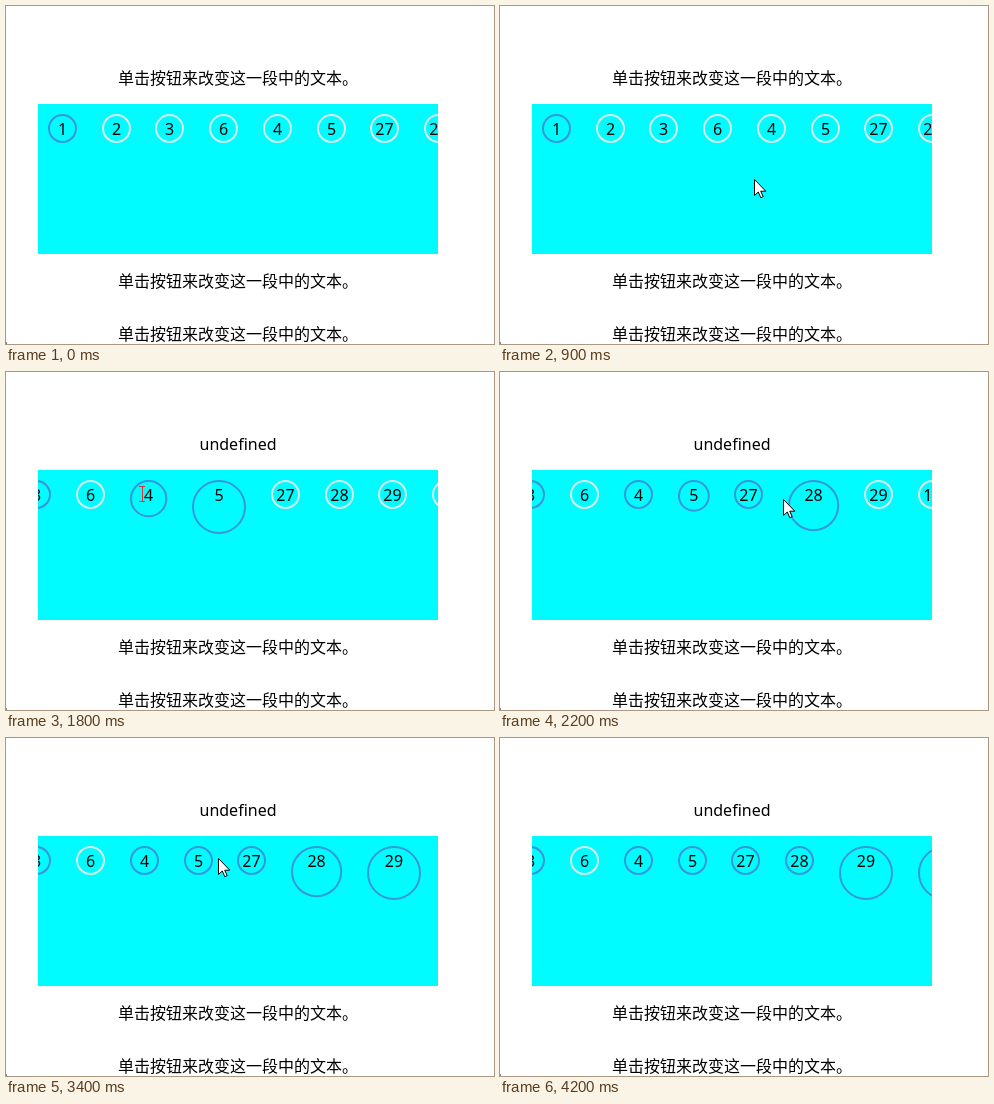
Write an HTML page with a canvas that moves like this. It is 488 px wide and 338 px high and loops after 4.6 s.

```html
<!DOCTYPE html>
<html lang="zh">
<head>
<meta charset="utf-8">
<style>
  html, body { margin: 0; width: 100%; height: 100%; overflow: hidden; background: #fff; }
  canvas { display: block; }
</style>
</head>
<body>
<canvas width="488" height="338"></canvas>
<script>
const ctx = document.querySelector('canvas').getContext('2d');
const LOOP = 4600, STEP = 100;
const SIZE = 29, PITCH = 53.74, GROWTH = 25, GROW_MS = 300;
const PROMPT = '单击按钮来改变这一段中的文本。';

// Each label is followed by its visits: [grow from, shrink from].
// The first visit also turns the ring blue.
const items = [
  ['1', [-1, -1]],
  ['2'],
  ['3', [1700, 1700]],
  ['6'],
  ['4', [1600, 1700], [3600, 3850]],
  ['5', [1500, 2000], [3400, 3850]],
  ['27', [2000, 2000]],
  ['28', [2000, 2300], [3200, 3850]],
  ['29', [2300, 2600], [3000, LOOP]],
  ['10', [2700, LOOP]]
];

// Time and position of each turn of the pointer.
const turns = [
  [300, 437, 265], [600, 254, 173], [1400, 254, 173], [1500, 186, 139],
  [1800, 136, 122], [2200, 283, 127], [2800, 415, 122], [3000, 347, 125],
  [3600, 145, 117], [3800, 300, 117], [4200, 512, 117]
];

const ramp = (t, from, to) => Math.min(1, Math.max(0, (t - from) / (to - from)));
const easeOut = u => 1 - (1 - u) ** 2;
const grown = (t, from) => easeOut(ramp(t, from, from + GROW_MS));

function scrollAt(t) {
  return 60 * Math.sin(Math.PI * ramp(t, 400, 900)) + 133 * ramp(t, 900, 1300);
}

function pointerAt(t) {
  let [, x, y] = turns[0];
  for (let i = 1; i < turns.length; i++) {
    const u = ramp(t, turns[i - 1][0], turns[i][0]);
    x += (turns[i][1] - turns[i - 1][1]) * u;
    y += (turns[i][2] - turns[i - 1][2]) * u;
  }
  return { x: Math.round(x), y: Math.round(y) };
}

function layout(t) {
  let left = 42 - scrollAt(t);
  return items.map(([label, ...visits]) => {
    const extra = visits.reduce((sum, [on, off]) => sum + GROWTH * (grown(t, on) - grown(t, off)), 0);
    const half = (SIZE + extra) / 2;
    const ring = { label, half, cx: Math.round(left) + half, blue: visits.length > 0 && t > visits[0][0] };
    left += PITCH + extra;
    return ring;
  });
}

function write(text, x, baseline) {
  ctx.fillStyle = '#000';
  ctx.fillText(text, x, baseline);
}

function drawList(rings) {
  ctx.save();
  ctx.beginPath();
  ctx.rect(32, 98, 400, 150);
  ctx.clip();
  ctx.fillStyle = '#00fcff';
  ctx.fillRect(32, 98, 400, 150);
  ctx.lineWidth = 2;
  for (const { label, half, cx, blue } of rings) {
    ctx.beginPath();
    ctx.arc(cx, 108 + half, half - 1, 0, 7);
    ctx.strokeStyle = blue ? '#3498db' : '#d5ebeb';
    ctx.stroke();
    write(label, cx, 129);
  }
  ctx.restore();
}

const arrow = new Path2D('M.5 .5V16.5L4.3 13L6.8 18.7L9.2 17.6L6.7 12.2H11.8Z');
const beam = new Path2D('M-3 -7.5H3M.5 -7.5V7.5M-3 7.5H3');

function drawPointer({ x, y }, overText) {
  ctx.save();
  ctx.translate(x, y);
  ctx.lineWidth = 1;
  if (overText) {
    ctx.strokeStyle = '#d33';
    ctx.stroke(beam);
  } else {
    ctx.fillStyle = '#fff';
    ctx.fill(arrow);
    ctx.strokeStyle = '#000';
    ctx.stroke(arrow);
  }
  ctx.restore();
}

function draw(t) {
  const rings = layout(t);
  const pointer = pointerAt(t);
  const hovered = pointer.y < 134 && rings.find(ring => Math.abs(pointer.x - ring.cx) < 12);
  const reply = hovered && hovered.label === '27' ? '78888' : 'undefined';

  ctx.fillStyle = '#fff';
  ctx.fillRect(0, 0, 488, 338);
  ctx.font = '16px "Noto Sans", "Noto Sans CJK SC", "Noto Sans CJK", sans-serif';
  ctx.textAlign = 'center';
  write(t < 1600 ? PROMPT : reply, 232, 78);
  write(PROMPT, 232, 281);
  write(PROMPT, 232, 334);
  ctx.fillStyle = '#888';
  ctx.fillRect(0, 336, 1, 2);
  drawList(rings);
  if (t >= turns[0][0]) drawPointer(pointer, hovered);
}

const start = performance.now();
function tick() {
  const t = (performance.now() - start) % LOOP;
  draw(Math.floor(t / STEP) * STEP);
  requestAnimationFrame(tick);
}
tick();
</script>
</body>
</html>
```
